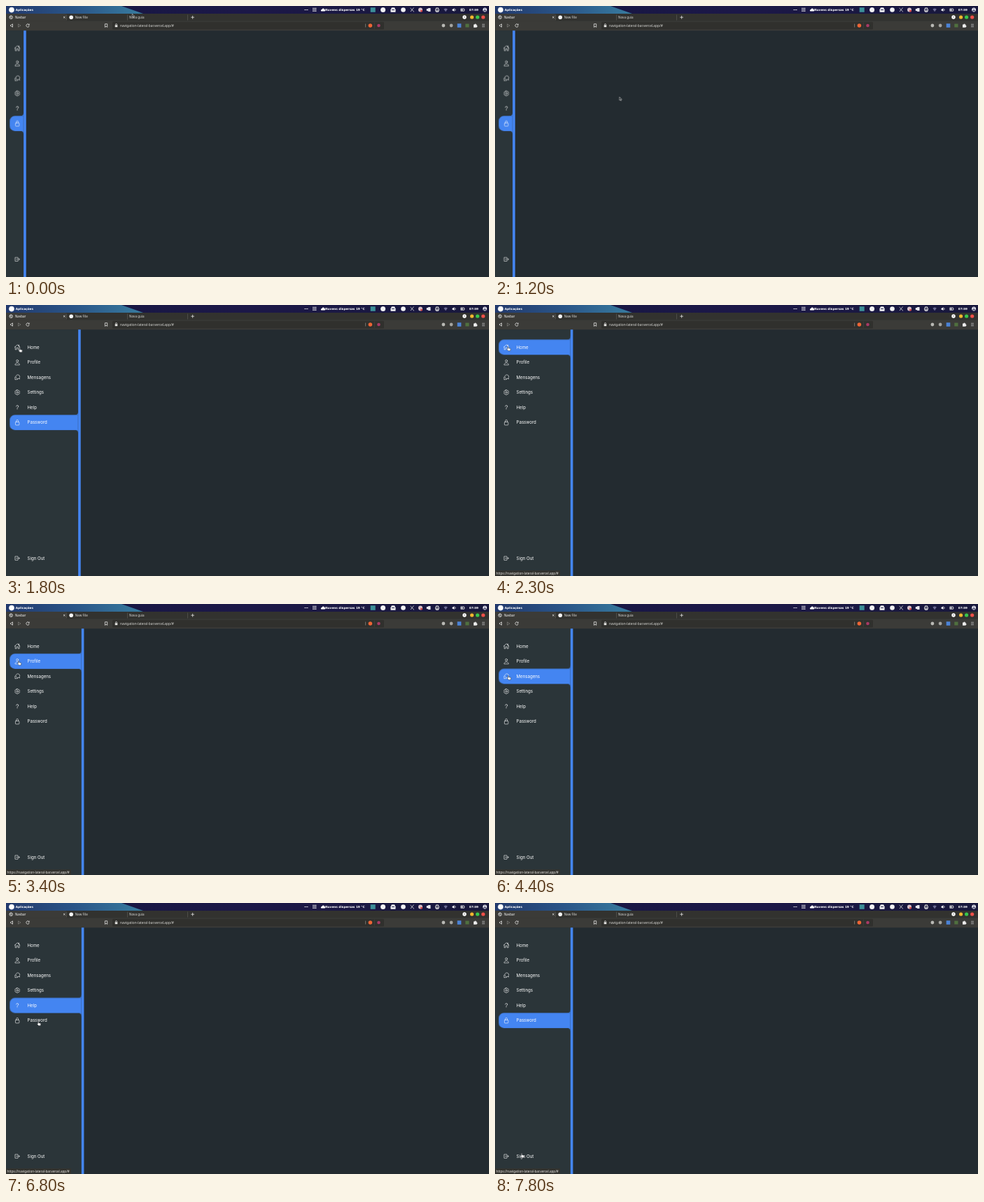
These frames come from a looping animation (690 px wide and 388 px high, 8000 ms). An HTML page:

```html
<!DOCTYPE html>
<html lang="pt">
<head>
<meta charset="utf-8">
<title>Navbar</title>
<style>
:root { --blue: #4485f1; --row: 60px; --loop: 8s infinite; }
html, body { margin: 0; width: 100%; height: 100%; overflow: hidden; background: #232b30; }
.stage { position: relative; width: 690px; height: 388px; overflow: hidden; background: #232b30; }
.chrome, .cursor { position: absolute; left: 0; top: 0; }
.chrome text { font: 4.55px "Noto Sans", sans-serif; fill: #d8d8d5; }
.chrome .bar text { font: bold 4.2px "DejaVu Sans", sans-serif; fill: #fff; }
.line { fill: none; stroke: #e4e4e2; stroke-width: .8; }

/* The page is laid out for a 1920px screen and scaled down to the stage. */
.page {
  position: absolute; left: 0; top: 0; width: 1920px; height: 1080px;
  transform: scale(.359375); transform-origin: 0 0;
}
.side {
  position: absolute; left: 0; top: 98px; width: 80px; height: 982px;
  box-sizing: border-box; overflow: hidden; background: #2b3539;
  border-right: 10px solid var(--blue);
  animation: open var(--loop);
}
.row {
  position: absolute; left: 33px; top: calc(40px + var(--row) * var(--i));
  height: var(--row); display: flex; align-items: center; white-space: nowrap;
  font: 17px Inter, sans-serif; color: #fff;
}
.row svg {
  width: 24px; height: 24px; margin-right: 28px; overflow: visible;
  fill: none; stroke: #fff; stroke-width: 34; stroke-linejoin: round; stroke-linecap: round;
}
.row.last { top: 881px; }
.active {
  position: absolute; left: 15px; right: 0; top: 40px; height: var(--row);
  background: var(--blue); border-radius: 20px 0 0 20px;
  animation: select var(--loop) step-end;
}
.active::before, .active::after { content: ""; position: absolute; right: 0; width: 12px; height: 12px; }
.active::before { top: -12px; background: radial-gradient(circle at 0 0, transparent 11.5px, var(--blue) 12.5px); }
.active::after { bottom: -12px; background: radial-gradient(circle at 0 100%, transparent 11.5px, var(--blue) 12.5px); }

.status {
  position: absolute; left: 0; top: 380px; width: 93px; height: 8px; padding-left: 1.6px;
  box-sizing: border-box; background: #33332f; color: #e5e2de; white-space: nowrap;
  font: 4.57px/8px "Noto Sans", sans-serif;
  animation: status var(--loop) step-end;
}
.cursor { width: 8px; height: 9px; overflow: visible; animation: move var(--loop); }
.cursor path { stroke: #20262a; stroke-width: .5; fill: #fff; }
.cursor .arrow { fill: #20262a; stroke: #e8e8e8; animation: arrow var(--loop) step-end; }
.hand { animation: hand var(--loop) step-end; }

@keyframes open {
  0%, 18.125% { width: 80px; animation-timing-function: ease; }
  24.375%, 100% { width: 310px; }
}
@keyframes select {
  0% { transform: translateY(calc(var(--row) * 5)); }
  26.25% { transform: none; }
  42.5% { transform: translateY(var(--row)); }
  55% { transform: translateY(calc(var(--row) * 2)); }
  66.25% { transform: translateY(calc(var(--row) * 3)); }
  77.5% { transform: translateY(calc(var(--row) * 4)); }
  87.5%, 100% { transform: translateY(calc(var(--row) * 5)); }
}
@keyframes status { 0% { opacity: 0; } 23.75%, 100% { opacity: 1; } }
@keyframes arrow { 0% { opacity: 1; } 18.75% { opacity: 0; } 91.25% { opacity: 1; } 97.5%, 100% { opacity: 0; } }
@keyframes hand { 0% { opacity: 0; } 18.75% { opacity: 1; } 91.25% { opacity: 0; } 97.5%, 100% { opacity: 1; } }
/* The pointer is sampled ten times a second. */
@keyframes move {
  0%, 5% { transform: translate(180px, 11px); animation-timing-function: step-end; }
  6.25% { transform: translate(270px, 75px); animation-timing-function: step-end; }
  7.5%, 13.75% { transform: translate(382px, 150px); animation-timing-function: step-end; }
  15% { transform: translate(177.5px, 130px); animation-timing-function: step-end; }
  16.25% { transform: translate(95px, 98px); animation-timing-function: step-end; }
  17.5% { transform: translate(30px, 68px); animation-timing-function: step-end; }
  18.75% { transform: translate(20px, 62px); animation-timing-function: steps(3); }
  22.5% { transform: translate(17.5px, 61px); animation-timing-function: steps(2); }
  25%, 33.75% { transform: translate(16.5px, 59px); animation-timing-function: steps(4); }
  38.75%, 45% { transform: translate(16px, 81px); animation-timing-function: steps(5); }
  51.25%, 57.5% { transform: translate(17px, 102px); animation-timing-function: steps(4); }
  62.5%, 68.75% { transform: translate(29.5px, 123.3px); animation-timing-function: steps(5); }
  75%, 78.75% { transform: translate(38px, 145px); animation-timing-function: steps(5); }
  85%, 88.75% { transform: translate(44px, 169px); animation-timing-function: steps(2); }
  91.25% { transform: translate(36px, 190px); animation-timing-function: steps(2); }
  93.75% { transform: translate(24px, 270px); animation-timing-function: steps(3); }
  97.5%, 100% { transform: translate(36px, 358px); }
}
</style>
</head>
<body>
<div class="stage">
  <svg class="chrome" width="690" height="388" viewBox="0 0 690 388">
    <defs>
      <linearGradient id="sky">
        <stop stop-color="#22396c"/><stop offset=".5" stop-color="#2a5588"/><stop offset="1" stop-color="#387c9f"/>
      </linearGradient>
      <linearGradient id="night">
        <stop stop-color="#151640"/><stop offset=".5" stop-color="#1c1848"/><stop offset="1" stop-color="#18183c"/>
      </linearGradient>
    </defs>

    <g class="bar">
      <rect width="690" height="11" fill="url(#night)"/>
      <path d="M0 0H165L196 11H0Z" fill="url(#sky)"/>
      <circle cx="8" cy="5.6" r="3.8" fill="#fff"/>
      <text x="13.8" y="7.1">Aplicações</text>
      <path d="M426.4 5.5h5" stroke="#fff" stroke-width="1.2" stroke-dasharray="1.2 .7"/>
      <path d="M438.2 3.4h5M438.2 5.4h5M438.2 7.4h5" stroke="#fff" stroke-width="1.2" stroke-dasharray="1.2 .7"/>
      <path d="M450.5 7.6a1.4 1.4 0 0 1 .8-2.6a2 2 0 0 1 3.8 0a1.4 1.4 0 0 1 .3 2.6Z" fill="#fff"/>
      <text x="456" y="7.1" style="font-size:4.28px">Nuvens dispersas 19 °C</text>
      <rect x="520.7" y="2.2" width="7" height="6.6" fill="#3c8f98"/>
      <circle cx="538.6" cy="5.5" r="3.5" fill="#f2f2f4"/>
      <path d="M549.5 5.2L551 2.2h4l1.5 3v3.5h-7Z" fill="#f2f2f4"/><path d="M551 5.5h4" stroke="#22224a"/>
      <circle cx="567.5" cy="5.5" r="3.3" fill="#f2f2f4"/>
      <path class="line" d="M577.6 3L583 8.4M582.5 2.5L578 8"/>
      <circle cx="592" cy="5.5" r="3" fill="#d9c3ca"/><circle cx="593.5" cy="7" r="1.5" fill="#d84545"/>
      <path d="M600.8 4h1.5l1.2-1h3v5h-3l-1.2-1h-1.5Z" fill="#e8e8ee"/>
      <path class="line" d="M613.5 4.3h5v3h-5ZM614.5 4.3v-1.6h3v1.6M614.5 6.5h3v2h-3Z"/>
      <path d="M625.4 4.4q2.7-2 5.4 0L628.1 8.2Z" fill="#6c6c92"/>
      <path d="M637.6 4.5h1.3l1.5-1.4v5l-1.5-1.4h-1.3Z" fill="#fff"/><path class="line" d="M641.5 4q1.2 1.5 0 3"/>
      <path class="line" d="M649.8 3.9h4.6v3.4h-4.6ZM655 5v1.3"/><path d="M650.5 4.5h2v2.2h-2Z" fill="#fff"/>
      <text x="661.8" y="7.1" style="font-size:4.15px">07:59</text>
      <circle cx="684.1" cy="5.5" r="2.9" fill="#e6e6f0"/>
      <path d="M682.3 7.4q1.8-2 3.6 0M684.1 3.7v1.4" fill="none" stroke="#22224a" stroke-width="1.1"/>
    </g>

    <rect y="11" width="690" height="10.5" fill="#32322f"/>
    <rect y="11" width="86" height="10.5" fill="#3b3b38"/>
    <path d="M86.5 12.5v8M173.5 12.5v8M259.5 12.5v8" stroke="#555550" stroke-width=".8"/>
    <rect y="21.3" width="690" height="14" fill="#3b3b38"/>
    <rect x="152" y="22.7" width="388" height="10.8" rx="1.5" fill="#30302d"/>

    <circle class="line" cx="7.2" cy="16.2" r="2.3"/><path class="line" d="M5 15.5l2 .5l1 2M6.5 14l2 1.5"/>
    <text x="12.9" y="17.9" style="fill:#fff">Navbar</text>
    <path class="line" d="M82.1 15l2.4 2.4M84.5 15l-2.4 2.4"/>
    <circle cx="93.2" cy="16.2" r="2.8" fill="#f5f5f5"/>
    <text x="98.8" y="17.9">New File</text>
    <text x="176" y="17.9">Nova guia</text>
    <path class="line" d="M264.3 16.2h4.6M266.6 13.9v4.6"/>
    <circle cx="655" cy="16" r="2.7" fill="#fff"/><path d="M654 15.5h2l-1 1.3Z" fill="#333"/>
    <circle cx="665.6" cy="16" r="2.6" fill="#f2b52f"/>
    <circle cx="673.6" cy="16" r="2.6" fill="#38c64c"/>
    <circle cx="681.7" cy="16" r="2.6" fill="#ee5049"/>

    <path class="line" d="M9.5 25.8v4.4L6 28Z"/>
    <path class="line" d="M17.5 25.8v4.4L21 28Z" opacity=".35"/>
    <path class="line" d="M32.7 26.5a2.2 2.2 0 1 0 .5 2M33.2 25.5v1.7h-1.7"/>
    <path class="line" d="M141.4 25.7h3.3v4.7l-1.65-1.3l-1.65 1.3Z"/>
    <rect x="155.7" y="27.3" width="3.6" height="2.9" fill="#e4e4e2"/><path class="line" d="M156.5 27.3v-.8a1 1 0 0 1 2 0v.8"/>
    <text x="163" y="29.7" style="font-size:4.78px">navigation-lateral-bar.vercel.app/#</text>
    <path d="M513.6 25.5v5" stroke="#85857f" stroke-width=".8"/>
    <circle cx="520.4" cy="28" r="2.8" fill="#ee6535"/>
    <path d="M526.3 23.5v9" stroke="#484843" stroke-width=".6"/>
    <circle cx="532.5" cy="28" r="2.3" fill="#a83a66"/>
    <circle cx="624.9" cy="28" r="2.4" fill="#b9b9b5"/>
    <circle cx="636.1" cy="28" r="2.4" fill="#a4a4a0"/>
    <rect x="644.7" y="25.2" width="5.6" height="5.6" fill="#4b83d6"/>
    <rect x="656.3" y="25.5" width="5.2" height="5" fill="#50703f"/>
    <path d="M668 26.5h1.5a1 1 0 0 1 2 0h1v1.5a1 1 0 0 1 0 2v.8h-4.5Z" fill="#eee"/>
    <path class="line" d="M680 26.2h4M680 28h4M680 29.8h4" style="stroke:#aaa"/>
  </svg>

  <div class="page">
    <div class="side">
      <div class="active"></div>
      <div class="row" style="--i:0"><svg viewBox="0 0 512 512"><path d="M80 212V464H192V304H320V464H432V212M32 256L256 48L480 256M400 179V64H352V133"/></svg>Home</div>
      <div class="row" style="--i:1"><svg viewBox="0 0 512 512"><ellipse cx="256" cy="144" rx="88" ry="96"/><path d="M64 464C64 250 448 250 448 464Z"/></svg>Profile</div>
      <div class="row" style="--i:2"><svg viewBox="0 0 512 512"><path d="M432 318A172 168 0 1 0 370 365L450 392ZM66 232Q20 310 74 388L64 464L140 440Q220 470 284 432"/></svg>Mensagens</div>
      <div class="row" style="--i:3"><svg viewBox="0 0 512 512"><path d="M210 48H302L325 105L390 95L458 185L425 256L458 327L390 417L325 407L302 464H210L187 407L122 417L54 327L87 256L54 185L122 95L187 105Z"/><circle cx="256" cy="256" r="76"/></svg>Settings</div>
      <div class="row" style="--i:4"><svg viewBox="0 0 512 512" style="stroke-width:42"><path d="M160 164C164 58 352 58 352 164C352 250 248 240 248 324M248 395v8"/></svg>Help</div>
      <div class="row" style="--i:5"><svg viewBox="0 0 512 512"><rect x="96" y="208" width="320" height="272" rx="48"/><path d="M336 208V113a80 80 0 0 0-160 0V208"/></svg>Password</div>
      <div class="row last"><svg viewBox="0 0 512 512"><path d="M304 336V416H64V96H304V176M368 336L448 256L368 176M176 256H432"/></svg>Sign Out</div>
    </div>
  </div>

  <div class="status">https://navigation-lateral-bar.vercel.app/#</div>

  <svg class="cursor" viewBox="0 0 8 9">
    <path class="arrow" d="M.3 .2V5L1.4 4L2.2 5.8L3 5.4L2.2 3.7H3.7Z"/>
    <path class="hand" d="M1.5 .8Q2.1 0 2.7 .8V2.7L5.2 3.2Q5.9 3.4 5.8 4.2L5.3 6.7H2.5L.4 4.3Q.5 3.5 1.5 4Z"/>
  </svg>
</div>
</body>
</html>
```
